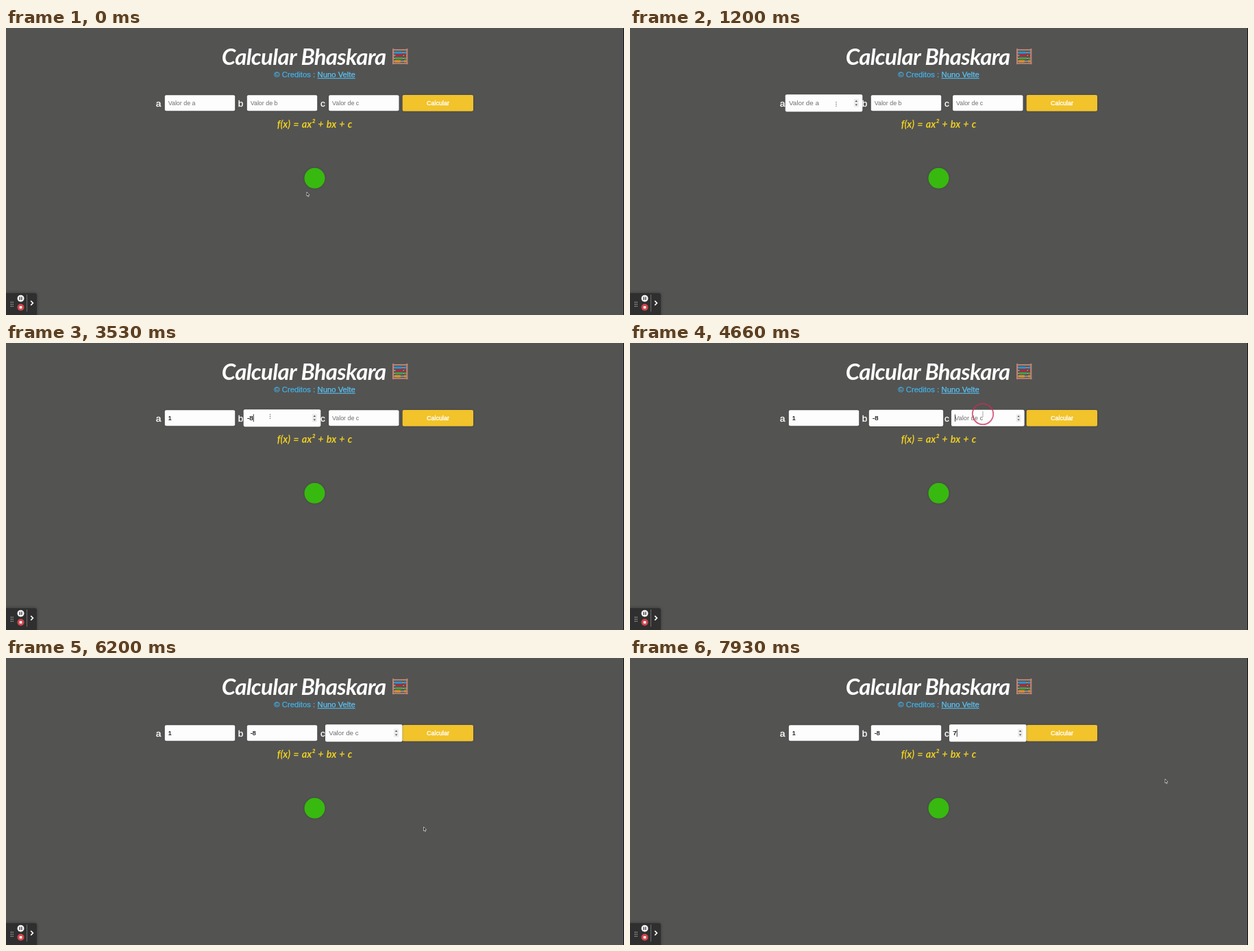
These frames come from a looping animation (902 by 420 pixels, 8000 ms). An HTML page with a canvas:

```html
<!DOCTYPE html>
<html lang="pt">
<head>
<meta charset="utf-8">
<title>Calcular Bhaskara</title>
<style>
html, body { margin: 0; width: 100%; height: 100%; overflow: hidden; background: #535352; }
canvas { display: block; width: 902px; height: 420px; }
</style>
</head>
<body>
<canvas id="stage"></canvas>
<script>
const W = 902, H = 420, LOOP = 8000;
const SANS = '"Liberation Sans", Arial, sans-serif';
const SCRIPT = 'Lato, "Open Sans", cursive';
const canvas = document.getElementById('stage');
const ctx = canvas.getContext('2d');
const dpr = window.devicePixelRatio || 1;
canvas.width = W * dpr;
canvas.height = H * dpr;

const clamp = v => Math.max(0, Math.min(1, v));
const easeOut = t => 1 - (1 - t) * (1 - t);
const easeBoth = t => t * t * (3 - 2 * t);
const within = (t, spans) => spans.some(([from, to]) => t >= from && t < to);

const START = { x: 439, y: 240 };
const MOVES = [
  { from: 30, to: 700, x: 301, y: 111.5 },
  { from: 1480, to: 1950, x: 385.5, y: 107.5 },
  { from: 3770, to: 4520, x: 515, y: 104 },
  { from: 4720, to: 5330, x: 609.5, y: 247 },
  { from: 7440, to: 7920, x: 781, y: 177 }
];
const CLICKS = [700, 2000, 4590];

const FIELDS = [
  { name: 'a', labelX: 218.8, cx: 283, focus: 700, blur: 2000, value: '1', typed: 1460,
    caret: [[700, 1200], [1460, 2000]] },
  { name: 'b', labelX: 338.8, cx: 403, focus: 2000, blur: 4590, value: '-8', typed: 3530,
    caret: [[2000, 2530], [3060, 4060]] },
  { name: 'c', labelX: 459, cx: 522.3, focus: 4590, blur: 9000, value: '7', typed: 7260,
    caret: [[4590, 5130], [5660, 6200], [6600, 7060], [7260, 8000]] }
];
const FIELD_Y = 109.8, FIELD_W = 102.4, FIELD_H = 23;

function pointerAt(t) {
  let { x, y } = START;
  for (const m of MOVES) {
    const k = easeBoth(clamp((t - m.from) / (m.to - m.from)));
    x += (m.x - x) * k;
    y += (m.y - y) * k;
  }
  return { x, y };
}

// heft thickens the glyphs with a thin outline
function text(str, x, y, font, color, { align = 'left', letter = 0, word = 0, heft = 0 } = {}) {
  ctx.font = font;
  ctx.fillStyle = ctx.strokeStyle = color;
  ctx.textAlign = align;
  ctx.letterSpacing = letter + 'px';
  ctx.wordSpacing = word + 'px';
  ctx.fillText(str, x, y);
  if (!heft) return;
  ctx.lineWidth = heft;
  ctx.strokeText(str, x, y);
}

function box(x, y, w, h, r, color) {
  ctx.fillStyle = color;
  ctx.beginPath();
  ctx.roundRect(x, y, w, h, r);
  ctx.fill();
}

function disc(x, y, r, color) {
  ctx.fillStyle = color;
  ctx.beginPath();
  ctx.arc(x, y, r, 0, Math.PI * 2);
  ctx.fill();
}

function poly(points, color) {
  ctx.fillStyle = color;
  ctx.beginPath();
  points.forEach(([x, y]) => ctx.lineTo(x, y));
  ctx.closePath();
  ctx.fill();
}

function shaded(blur, alpha, paint) {
  ctx.save();
  ctx.shadowColor = `rgba(0,0,0,${alpha})`;
  ctx.shadowBlur = blur * dpr;
  paint();
  ctx.restore();
}

function drawAbacus() {
  const rows = [['#2a94d6', 567, 11], ['#b3263c', 568.5, 11],
                ['#4a9a45', 568, 11], ['#d8902f', 567, 9]];
  rows.forEach(([color, x, w], i) => {
    const y = 36 + i * 4.2;
    box(566, y - 0.5, 19, 1, 0, '#cdbfb8');
    box(x, y - 1.6, w, 3.2, 1, color);
    box(581, y - 1.5, 3, 3, 1, color);
  });
  const wood = '#b98472';
  box(564, 30, 2.2, 23.3, 0.8, wood);
  box(584.2, 30, 2.2, 23.3, 0.8, wood);
  box(564, 31, 22.4, 2, 0.5, wood);
  box(564, 50.8, 22.4, 2, 0.5, wood);
}

function drawHeader() {
  text('Calcular Bhaskara', 434.6, 53.8, 'italic 700 33px ' + SCRIPT, '#fff',
    { align: 'center', letter: -0.7 });
  drawAbacus();
  const font = '11.3px ' + SANS, name = 'Nuno Velte';
  text('© Creditos :', 391.3, 72, font, '#43b2e6', { heft: 0.25 });
  text(name, 454.5, 72, font, '#58c4f5', { heft: 0.25 });
  ctx.fillRect(454.5, 73.2, ctx.measureText(name).width, 1);
}

function drawSpinner() {
  box(39.8, -5.4, 6.4, 10.8, 0.5, '#ececec');
  for (const s of [-1, 1]) {
    poly([[41.4, s * 1.6], [44.6, s * 1.6], [43, s * 3.6]], '#505050');
  }
}

function drawField(f, t, mouse) {
  const grow = easeOut(clamp((t - f.focus) / 300)) - easeOut(clamp((t - f.blur) / 300));
  const focused = t >= f.focus && t < f.blur;
  const hovered = Math.abs(mouse.x - f.cx) < FIELD_W / 2 &&
                  Math.abs(mouse.y - FIELD_Y) < FIELD_H / 2;
  const filled = t >= f.typed;
  const font = '8.9px ' + SANS;

  text(f.name, f.labelX, 114.8, '13.6px ' + SANS, '#fff', { heft: 0.35 });
  ctx.save();
  ctx.translate(f.cx, FIELD_Y);
  ctx.scale(1 + 0.1 * grow, 1 + 0.1 * grow);
  shaded(3, 0.2, () => box(-FIELD_W / 2, -FIELD_H / 2, FIELD_W, FIELD_H, 2, '#fdfdfd'));
  text(filled ? f.value : 'Valor de ' + f.name, -46.3, 3, font, filled ? '#000' : '#6d6d6d',
    { heft: filled ? 0.2 : 0 });
  if (within(t, f.caret)) {
    const x = -46.3 + (filled ? ctx.measureText(f.value).width : 0);
    box(x, -5, 0.8, 10, 0, '#111');
  }
  if (focused || hovered) drawSpinner();
  ctx.restore();
  return hovered;
}

function drawButton() {
  shaded(3, 0.2, () => box(578.7, 98, 103.3, 23.8, 2, '#f2c32a'));
  text('Calcular', 630.4, 113, '9px ' + SANS, '#fff', { align: 'center', heft: 0.35 });
}

function drawRecorder() {
  shaded(4, 0.35, () => box(-4, 388, 49, 36, 3, '#2f2f30'));
  for (let i = 0; i < 6; i++) {
    box(6.8 + (i % 2) * 2.6, 400.6 + (i >> 1) * 3, 1.3, 1.3, 0.4, '#c4c4c4');
  }
  disc(21.5, 395.8, 5, '#f4f4f4');
  box(19.5, 393.6, 1.3, 4.4, 0, '#333');
  box(22.2, 393.6, 1.3, 4.4, 0, '#333');
  disc(21.5, 408.8, 5, '#d2454c');
  box(19.7, 407, 3.6, 3.6, 0.4, '#fff');
  box(30, 390, 0.9, 25, 0, '#777');
  ctx.strokeStyle = '#fff';
  ctx.lineWidth = 1.6;
  ctx.beginPath();
  ctx.moveTo(36.2, 399.4);
  ctx.lineTo(39.4, 402.5);
  ctx.lineTo(36.2, 405.6);
  ctx.stroke();
}

function drawRing(t, mouse) {
  const click = CLICKS.find(c => t >= c && t < c + 300);
  if (click === undefined) return;
  const k = (t - click) / 300;
  ctx.globalAlpha = 1 - k;
  ctx.strokeStyle = '#d02a55';
  ctx.lineWidth = 1.8;
  ctx.beginPath();
  ctx.arc(mouse.x, mouse.y, 15.2, 0, Math.PI * 2);
  ctx.stroke();
  ctx.globalAlpha = 1;
}

function drawPointer({ x, y }, overField) {
  if (overField) {
    box(x - 0.4, y - 3.5, 0.8, 7, 0, 'rgba(90,90,90,.3)');
    for (const dy of [-3, 0, 3]) box(x - 0.6, y + dy - 0.6, 1.2, 1.2, 0, '#777');
    return;
  }
  const arrow = [[0, 0], [0, 6], [1.3, 4.9], [2.2, 7], [3.1, 6.6], [2.3, 4.6], [4, 4.4]]
    .map(([dx, dy]) => [x + dx, y + dy]);
  poly(arrow, '#1c1c1c');
  ctx.strokeStyle = '#e4e4e4';
  ctx.lineWidth = 0.7;
  ctx.stroke();
}

function draw(t) {
  ctx.setTransform(dpr, 0, 0, dpr, 0, 0);
  box(0, 0, W, H, 0, '#535352');
  box(901, 0, 1, H, 0, '#111');
  const mouse = pointerAt(t);

  drawHeader();
  drawButton();
  const overField = FIELDS.map(f => drawField(f, t, mouse)).includes(true);
  text('f(x) = ax² + bx + c', 450.5, 146.3, 'italic 700 14.4px ' + SCRIPT, '#ecce22',
    { align: 'center', word: 1 });
  shaded(3, 0.25, () => disc(450.5, 219.8, 15, '#38b90f'));
  drawRecorder();
  drawRing(t, mouse);
  drawPointer(mouse, overField);
}

const begin = performance.now();
function tick() {
  draw((performance.now() - begin) % LOOP);
  requestAnimationFrame(tick);
}
tick();
</script>
</body>
</html>
```
